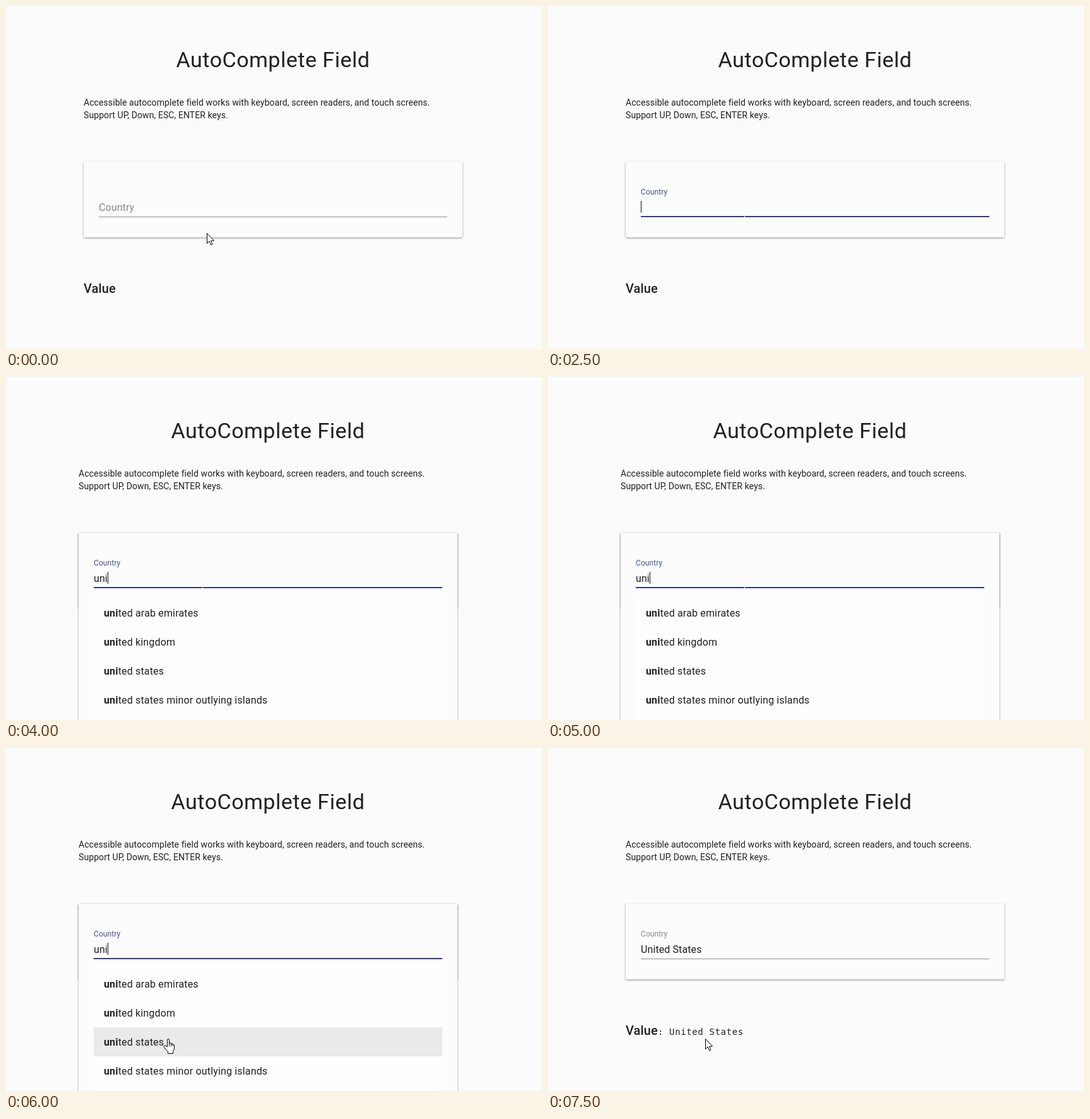
An HTML page for the animation above (8 s loop, 849 by 544 pixels).

```html
<!DOCTYPE html>
<html lang="en">
<head>
<meta charset="utf-8">
<title>AutoComplete Field</title>
<style>
  html, body { margin: 0; height: 100%; overflow: hidden; background: #fbfbfb; }
  svg { display: block; width: 849px; height: 544px; }
  text { font: 16px Roboto, sans-serif; fill: #202020; letter-spacing: .1px; white-space: pre; }
  .title { font-size: 34px; letter-spacing: .5px; }
  .intro { font-size: 14px; letter-spacing: .08px; }
  .value { font-size: 20px; font-weight: 500; }
  .result { font: 14px "DejaVu Sans Mono", monospace; letter-spacing: .62px; }
  .small { font-size: 12px; }
  .hint { fill: #888; }
  .focus { fill: #465092; }
  .list text { letter-spacing: .16px; }
  .list tspan { font-weight: 700; }
  .card {
    fill: #fcfcfc;
    filter: drop-shadow(0 1px 1px rgba(0,0,0,.26)) drop-shadow(0 1px 1.5px rgba(0,0,0,.2));
  }
  .pointer { fill: #fff; stroke: #000; stroke-linejoin: round; }

  /* Every change is a hard cut on an 8 s timeline. */
  .cut { animation: 8s step-end infinite; }
  .page { animation-name: page; }
  .idle { animation-name: idle; }
  .rest { animation-name: rest; }
  .active { animation-name: active; }
  .float { animation-name: float; }
  .open { animation-name: open; }
  .done { animation-name: done; }
  .u { animation-name: u; }
  .un { animation-name: un; }
  .un-all { animation-name: un-all; }
  .un-filtered { animation-name: un-filtered; }
  .uni { animation-name: uni; }
  .scrollbar { animation-name: scrollbar; }
  .row2 { animation-name: row2; }
  .row3 { animation-name: row3; }
  .caret { animation-name: caret-x, blink; }
  .notch { animation-name: notch; }
  .arrow { animation-name: arrow; }
  .beam { animation-name: beam; }
  .hand { animation-name: hand; }

  @keyframes page { 0%, 81.25%, 100% { transform: none } 37.5% { transform: translateX(-8px) } }
  @keyframes idle { 0% { opacity: 1 } 18.75%, 100% { opacity: 0 } }
  @keyframes rest { 0%, 81.25%, 100% { opacity: 1 } 9.375% { opacity: 0 } }
  @keyframes active { 0%, 81.25%, 100% { opacity: 0 } 9.375% { opacity: 1 } }
  @keyframes float { 0%, 81.25%, 100% { opacity: 0 } 18.75% { opacity: 1 } }
  @keyframes open { 0%, 81.25%, 100% { opacity: 0 } 37.5% { opacity: 1 } }
  @keyframes done { 0% { opacity: 0 } 81.25%, 100% { opacity: 1 } }
  @keyframes u { 0%, 43.75%, 100% { opacity: 0 } 37.5% { opacity: 1 } }
  @keyframes un { 0%, 50%, 100% { opacity: 0 } 43.75% { opacity: 1 } }
  @keyframes un-all { 0%, 46.875%, 100% { opacity: 0 } 43.75% { opacity: 1 } }
  @keyframes un-filtered { 0%, 50%, 100% { opacity: 0 } 46.875% { opacity: 1 } }
  @keyframes uni { 0%, 81.25%, 100% { opacity: 0 } 50% { opacity: 1 } }
  @keyframes scrollbar { 0%, 46.875%, 100% { opacity: 0 } 37.5% { opacity: 1 } }
  @keyframes row2 {
    0%, 71.875%, 100% { fill: transparent }
    65.625% { fill: #eee }
    68.75% { fill: #f7f7f7 }
  }
  @keyframes row3 {
    0%, 81.25%, 100% { fill: transparent }
    68.75% { fill: #eee }
    71.875% { fill: #eaeaea }
  }
  @keyframes caret-x {
    0%, 100% { transform: translateX(147px) }
    37.5% { transform: translateX(156px) }
    43.75% { transform: translateX(165px) }
    50% { transform: translateX(169px) }
  }
  @keyframes blink {
    0%, 25%, 56.25%, 68.75%, 81.25%, 100% { opacity: 0 }
    18.75%, 31.25%, 62.5%, 75% { opacity: 1 }
  }
  @keyframes notch { 0%, 65.625%, 100% { opacity: 0 } 21.875% { opacity: 1 } }
  @keyframes arrow {
    0% { transform: translate(318px, 360px); opacity: 1 }
    3.125% { transform: translate(297px, 336px); opacity: 1 }
    6.25% { transform: translate(249px, 461px); opacity: 0 }
    81.25%, 100% { transform: translate(249px, 461px); opacity: 1 }
  }
  @keyframes beam {
    0%, 21.875%, 100% { transform: translate(308px, 321px); opacity: 0 }
    6.25% { transform: translate(304px, 326px); opacity: 1 }
    18.75% { transform: translate(308px, 321px); opacity: 1 }
  }
  @keyframes hand {
    0%, 81.25%, 100% { transform: translate(249px, 461px); opacity: 0 }
    65.625% { transform: translate(323px, 426px); opacity: 1 }
    68.75% { transform: translate(262px, 459px); opacity: 1 }
    71.875% { transform: translate(249px, 461px); opacity: 1 }
  }
</style>
</head>
<body>
<svg viewBox="0 0 849 544">
  <g class="cut page">
    <text class="title" x="423" y="97" text-anchor="middle">AutoComplete Field</text>
    <text class="intro" x="123" y="158">Accessible autocomplete field works with keyboard, screen readers, and touch screens.</text>
    <text class="intro" x="123" y="178">Support UP, Down, ESC, ENTER keys.</text>

    <text class="value" x="123" y="455">Value</text>
    <text class="result cut done" x="174" y="455">: United States</text>

    <rect class="card" x="123" y="247" width="600" height="120" rx="2"/>
    <g class="cut open">
      <rect class="card" x="123" y="247" width="600" height="400" rx="2"/>
      <rect x="147" y="343" width="552" height="210" fill="#fefefe"/>
    </g>

    <text class="hint cut idle" x="147" y="325">Country</text>
    <text class="small focus cut float" x="147" y="299">Country</text>
    <text class="small hint cut done" x="147" y="299">Country</text>

    <rect class="cut rest" x="147" y="334" width="552" height="1" fill="#919191"/>
    <rect class="cut active" x="147" y="333" width="552" height="2" fill="#303b86"/>

    <text class="cut u" x="147" y="325">u</text>
    <text class="cut un" x="147" y="325">un</text>
    <text class="cut uni" x="147" y="325">uni</text>
    <text class="cut done" x="147" y="325">United States</text>
    <rect class="cut caret" y="309" width="1" height="19" fill="#111"/>

    <rect class="cut row2" x="147" y="397" width="552" height="46"/>
    <rect class="cut row3" x="147" y="443" width="552" height="46"/>

    <g class="list cut u">
      <text x="163" y="380"><tspan>u</tspan>ganda</text>
      <text x="163" y="426"><tspan>u</tspan>kraine</text>
      <text x="163" y="472"><tspan>u</tspan>nited arab emirates</text>
      <text x="163" y="518"><tspan>u</tspan>nited kingdom</text>
    </g>
    <g class="list cut un-all">
      <text x="163" y="380">uganda</text>
      <text x="163" y="426">ukraine</text>
      <text x="163" y="472"><tspan>un</tspan>ited arab emirates</text>
      <text x="163" y="518"><tspan>un</tspan>ited kingdom</text>
    </g>
    <g class="list cut un-filtered">
      <text x="163" y="380"><tspan>un</tspan>ited arab emirates</text>
      <text x="163" y="426"><tspan>un</tspan>ited kingdom</text>
      <text x="163" y="472"><tspan>un</tspan>ited states</text>
      <text x="163" y="518"><tspan>un</tspan>ited states minor outlying islands</text>
    </g>
    <g class="list cut uni">
      <text x="163" y="380"><tspan>uni</tspan>ted arab emirates</text>
      <text x="163" y="426"><tspan>uni</tspan>ted kingdom</text>
      <text x="163" y="472"><tspan>uni</tspan>ted states</text>
      <text x="163" y="518"><tspan>uni</tspan>ted states minor outlying islands</text>
    </g>

    <g class="cut scrollbar">
      <rect x="682" y="343" width="17" height="201" fill="#f1f1f1"/>
      <rect x="684" y="360" width="13" height="184" fill="#c1c1c1"/>
      <path d="M686.5 354l4-4 4 4z" fill="#a0a0a0"/>
    </g>
  </g>

  <rect class="cut notch" x="311" y="327" width="1" height="8" fill="#fff"/>

  <path class="pointer cut arrow" d="M.5.5V16.5L4.2 13 6.6 18.9 9 17.9 6.7 12.2H11.5Z"/>
  <path class="cut beam" fill="none" stroke="#000" d="M0 .5H3M4 .5H7M3.5 1V15M0 15.5H3M4 15.5H7"/>
  <path class="pointer cut hand" d="M6.5 13V2Q6.5.5 8 .5T9.5 2V8Q9.5 6.7 11 6.7T12.5 8V9Q12.5 7.8 13.8 7.8T15.1 9.2V10Q15.1 9 16.3 9T17.5 10.3V16L15.8 19.2V23.5H7.5V20.5L1.5 14Q0 11.6 1.8 10.9 3.5 10.4 6.5 13ZM9.5 8V12M12.5 9V12M15.1 10V12"/>
</svg>
</body>
</html>
```
